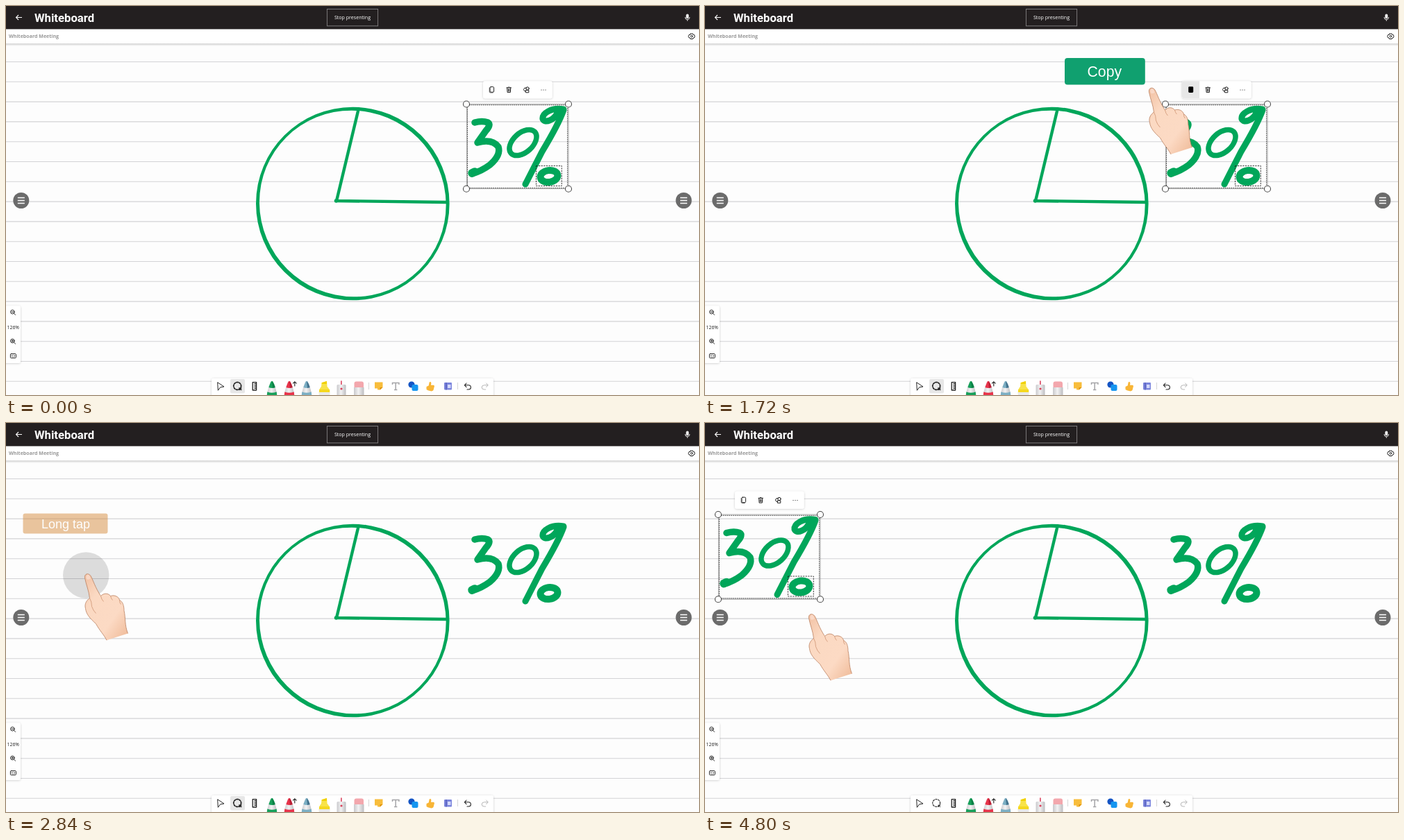
Write an HTML page that moves like this. It is 998 by 561 pixels and loops after 5 s.

```html
<!DOCTYPE html>
<html lang="en">
<head>
<meta charset="utf-8">
<title>Whiteboard</title>
<style>
html, body { margin: 0; width: 100%; height: 100%; overflow: hidden; background: #fdfdfd; }
svg { display: block; width: 100vw; height: 100vh; }
text { font-family: "Open Sans", "Noto Sans", sans-serif; }
.label text { font-family: "Liberation Sans", Arial, sans-serif; fill: #fff; text-anchor: middle; }
.icon { fill: none; stroke: #222; stroke-width: 1; stroke-linecap: round; stroke-linejoin: round; }
.panel { fill: #fff; filter: url(#shadow); }
.ink { fill: none; stroke: #00a65a; stroke-linecap: round; stroke-linejoin: round; }
</style>
</head>
<body>
<svg viewBox="0 0 998 561" xmlns="http://www.w3.org/2000/svg">
  <defs>
    <filter id="shadow" x="-20%" y="-30%" width="140%" height="160%">
      <feDropShadow dx="0" dy=".6" stdDeviation="1.6" flood-color="#000" flood-opacity=".2"/>
    </filter>
    <linearGradient id="fade" x2="0" y2="1">
      <stop stop-color="#000" stop-opacity=".17"/><stop offset="1" stop-color="#000" stop-opacity="0"/>
    </linearGradient>
    <linearGradient id="skin" x2=".9" y2="1">
      <stop stop-color="#f1c0a2"/><stop offset=".3" stop-color="#fbd9c2"/>
      <stop offset=".7" stop-color="#fcdac4"/><stop offset="1" stop-color="#f0bd9c"/>
    </linearGradient>
    <linearGradient id="metal">
      <stop stop-color="#c9c9cc"/><stop offset=".45" stop-color="#f2f2f3"/><stop offset="1" stop-color="#bdbdc0"/>
    </linearGradient>

    <g id="percent" class="ink">
      <path stroke-width="9.5" d="M675 168Q686 165 694 168Q699 171 691 180L679 197Q700 191 709 203Q713 215 697 229Q685 238 671 242"/>
      <path stroke-width="11.5" d="M671 241L675 239"/>
      <ellipse stroke-width="7.5" cx="744.5" cy="197" rx="23" ry="14" transform="rotate(-42 744.5 197)"/>
      <path stroke-width="9" d="M803 149C785 146 772 155 773 163C776 170 790 164 794 154M803 150Q796 170 772 210L748 257"/>
      <ellipse stroke-width="10" cx="782" cy="245.5" rx="12.5" ry="8.5" transform="rotate(-8 782 245.5)"/>
    </g>

    <g id="selection">
      <rect x="663.3" y="141.5" width="146.7" height="122.2" fill="none" stroke="#888" stroke-width=".7"/>
      <g fill="none" stroke="#222" stroke-width=".9" stroke-dasharray="1.6 1.2">
        <rect x="664.5" y="142.8" width="144.2" height="119.6"/>
        <rect x="763.5" y="230.5" width="36.8" height="29" stroke-dasharray="2.2 1.4"/>
      </g>
      <g fill="#fff" stroke="#4a4a4a" stroke-width="1.1">
        <circle cx="663" cy="141.5" r="4.5"/><circle cx="810" cy="141.5" r="4.5"/>
        <circle cx="663" cy="263.7" r="4.5"/><circle cx="810" cy="263.7" r="4.5"/>
      </g>
      <rect class="panel" x="687" y="108.3" width="99.7" height="25" rx="3"/>
      <g class="icon">
        <rect x="697" y="116.6" width="5.6" height="7.6" rx="1.2"/><path d="M696.2 118v5.6q0 1.4 1.4 1.4h3.6" stroke-width=".7"/>
        <path d="M721 117.8h6.4M723 117.5q1.2-1.8 2.4 0M721.6 118l.5 6.6h4.2l.5-6.6M723.4 119.6v3.4M725 119.6v3.4"/>
        <path d="M748 122.8h-1.2l-1.4-2.2 1.4-2.4h3"/><circle cx="751" cy="119" r="2.2"/><path d="M748.8 121.4h4v3.4h-4z"/>
      </g>
      <path d="M771 121h.1M774 121h.1M777 121h.1" stroke="#222" stroke-width="1.2" stroke-linecap="round"/>
    </g>
  </defs>

  <rect width="998" height="561" fill="#fdfdfd"/>
  <path id="rules" stroke="#d3d3d6" stroke-width="1.1"/>
  <rect y="33" width="998" height="21" fill="#fff"/>
  <rect y="54" width="998" height="4" fill="url(#fade)"/>
  <rect width="998" height="33.4" fill="#231f20"/>

  <path d="M23 16.5H14.5M18 13L14.5 16.5L18 20" fill="none" stroke="#fff" stroke-width="1.1"/>
  <text x="41" y="23" fill="#fff" font-size="16.7" font-weight="700" style="font-family:Roboto,sans-serif">Whiteboard</text>
  <rect x="462.4" y="4.4" width="73.2" height="24.4" fill="none" stroke="#858384" stroke-width=".9"/>
  <text x="499" y="19" fill="#fff" font-size="7.1" text-anchor="middle">Stop presenting</text>
  <rect x="979.4" y="11.5" width="3.8" height="6.6" rx="1.9" fill="#fff"/>
  <path d="M978 16q0 3.6 3.3 3.6t3.3-3.6M981.3 19.6v2" fill="none" stroke="#fff" stroke-width=".9"/>
  <text x="4" y="46.4" fill="#999" font-size="7.05" font-weight="700">Whiteboard Meeting</text>
  <g class="icon" stroke-width=".9"><path d="M985.6 40h3.6l.6 1.4 1.6.4.6 1.9-.6 1.9-1.6.4-.6 1.5h-3.6l-.6-1.5-1.6-.4-.6-1.9.6-1.9 1.6-.4z"/><circle cx="987.4" cy="43.7" r="1.4"/></g>

  <path fill="#00a65a" fill-rule="evenodd" d="M360 285a139.3 139.3 0 1 0 278.6 0a139.3 139.3 0 1 0-278.6 0zM405.1 379.4A133.3 135.3 -45 0 0 593.5 190.6A133.3 135.3 -45 0 0 405.1 379.4z"/>
  <path class="ink" stroke-width="4.4" d="M507 151.5L476 281L633.5 283"/>
  <circle cx="475.4" cy="281" r="2.7" fill="#00a65a"/>

  <use href="#percent"/>
  <g id="firstSelection">
    <use href="#selection"/>
    <g id="copyHover"><path d="M712 108.3h-22q-3 0-3 3v19q0 3 3 3h22z" fill="#e7e7e7"/><rect x="696.2" y="116.2" width="7" height="8.8" rx="1.4"/></g>
  </g>
  <g id="pasted" transform="translate(-644 -9.5)"><use href="#percent"/><use href="#selection"/></g>

  <g id="menus"></g>

  <g>
    <rect class="panel" x="-4" y="432.5" width="25" height="82.5" rx="3"/>
    <g class="icon"><circle cx="9.4" cy="441.2" r="2.8"/><path d="M11.6 443.4L13.6 445.4M8.2 441.2h2.4"/>
      <circle cx="9.4" cy="483" r="2.8"/><path d="M11.6 485.2L13.6 487.2M8.2 483h2.4M9.4 481.8v2.4"/>
      <rect x="6.4" y="501.6" width="8" height="6" rx="1"/><path d="M9.4 503.6L8 504.6L9.4 505.6M11.4 503.6L12.8 504.6L11.4 505.6" stroke-width=".8"/></g>
    <text x="10.3" y="465.7" font-size="6.9" text-anchor="middle" fill="#222">126%</text>
  </g>

  <rect class="panel" x="296" y="537" width="406" height="30" rx="3"/>
  <rect id="lassoOn" x="323" y="538" width="21" height="20.5" rx="2" fill="#e7e7e7"/>
  <g class="icon">
    <path d="M305 543L314 549L308.8 549.8L305.6 554z"/>
    <g id="lasso"><circle cx="333.2" cy="548" r="5.4" stroke-dasharray="2.3 1.6"/><path d="M336 551l2.6 2.4M338.6 551l-2.6 2.4"/></g>
    <path d="M355.2 542.6h5.4v11.4h-5.4zM358 545h2M358 548h2M358 551h2" stroke-width="1.3"/>
    <path d="M415.8 548v-6M413.4 544.2L415.8 541.8L418.2 544.2" stroke-width="1.1"/>
    <path d="M663 544L660.4 546.8L663 549.6M660.8 546.8H666Q669.4 547 669.4 550T666 553H664" stroke-width="1.1"/>
    <path d="M691.6 544L694.2 546.8L691.6 549.6M693.8 546.8H688.6Q685.2 547 685.2 550T688.6 553H690.6" stroke="#b5b5b5"/>
  </g>
  <g id="pens"></g>
  <path d="M451 561Q450 552 454 549L454.6 543L462 541L462.6 549Q467 552 466 561z" fill="#f8e34a"/>
  <path d="M454.8 543.6L461.8 541L462 545H454.8z" fill="#f0d000"/><path d="M450.8 556h15.6v5h-15.6z" fill="#e9e9ea"/><path d="M451 553h15.2v4h-15.2z" fill="#f5d820"/>
  <path d="M482.9 541v6" stroke="#d9425c" stroke-width="1.6" stroke-linecap="round"/>
  <rect x="476.5" y="546" width="13" height="18" rx="1.5" fill="url(#metal)"/><circle cx="483" cy="552" r="1.6" fill="#d9425c"/>
  <rect x="501.5" y="541.5" width="13.5" height="12" rx="3" fill="#f3a7ad"/><rect x="501" y="550" width="14.5" height="14" fill="url(#metal)"/>
  <path d="M522.5 543v10M650.5 543v10" stroke="#d6d6d6"/>
  <path d="M531 542.5h11.5v7.5L539 553.5h-4v-2h-4z" fill="#f8bd3c"/><path d="M538.5 553.5V550h4z" fill="#dd9110"/>
  <path d="M556.5 546v-2.4h9.4v2.4M561.2 543.6v10M559 553.6h4.4" fill="none" stroke="#a5a5a8" stroke-width="1.5"/>
  <circle cx="584" cy="546" r="4.6" fill="#1454c4"/><rect x="584.5" y="546" width="9" height="9" rx="2" fill="#1595f0"/>
  <path d="M605.5 549l3.2-1.4 1-5.2q2.6-1.2 2.7 1.6l-.4 2.8h4q1.7 1 .6 3l-1.1 4.2q-1 1.5-3 1.4l-5-1.2-2-1.2z" fill="#f8b536"/>
  <rect x="631" y="543" width="11" height="10.6" rx="1" fill="#7c86dd"/><path d="M634 543v10.6" stroke="#4850b0"/><path d="M636 546h4.5v5H636z" fill="#d4d9fa"/>

  <g id="sideButtons"></g>

  <circle id="press" cx="115.2" cy="219.5" r="33.2" fill="#000" fill-opacity=".13"/>
  <g id="copyLabel" class="label"><rect x="518" y="75" width="115.8" height="38.5" rx="4" fill="#10a06f"/><text x="575.3" y="101.7" font-size="21.2">Copy</text></g>
  <g id="tapLabel" class="label"><rect x="24.5" y="130.5" width="122" height="29" rx="3" fill="#d48938"/><text x="86" y="151.6" font-size="18">Long tap</text></g>

  <g id="hand">
    <path fill="url(#skin)" d="M1 6C0 0 6-2 9.500 3C13 9 16 20 24 32C29 27 35 28 38 32C44 30 50 33 51 38C56 40 57.500 47 57.500 53C60 64 58 73 63 86L32.500 95.800C28 87 23 83 17 72C8 64 3 58 2 50C0 43 4 38 8 35C7 25 3 16 1 6z"/>
    <path fill="none" stroke="#b67a58" stroke-width=".75" d="M63 86C58 73 60 64 57.500 53C57.500 47 56 40 51 38C50 33 44 30 38 32C35 28 29 27 24 32C16 20 13 9 9.500 3C6-2 0 0 1 6C3 16 7 25 8 35C4 38 0 43 2 50C3 58 8 64 17 72C23 83 28 87 32.500 95.800"/>
    <path fill="none" stroke="#c98c69" stroke-width=".7" d="M8 35Q11 40 11 47Q13 53 17 57M24 32Q25 37 28 40M38 32Q39 36 41 38M51 38Q51 42 53 44"/>
    <path d="M3 5Q3 1 6 1Q8 2 9 7Q6 9 4 8z" fill="#fbe0d3" opacity=".7"/>
  </g>
</svg>
<script>
const el = id => document.getElementById(id);
const clamp = v => Math.min(1, Math.max(0, v));
const ramp = (t, from, to) => clamp((t - from) / (to - from));
const show = (id, on) => el(id).setAttribute('display', on ? 'inline' : 'none');
const fade = (id, value) => el(id).setAttribute('opacity', value);

el('rules').setAttribute('d', Array.from({ length: 17 }, (_, i) => `M0 ${80.5 + 28.8 * i}H998`).join(''));

el('pens').innerHTML = [[383, '#17a05a', '#0b8146'], [408, '#e8334a', '#b81f35'], [433, '#7cafc4', '#44738e']]
  .map(([x, tip, dark]) => `<g transform="translate(${x} 541)">
    <path d="M-7.200 20Q-6.500 12-1.800 1Q0-1 1.800 1Q6.500 12 7.200 20z" fill="url(#metal)"/>
    <path d="M-4.700 9Q-3 4-1.500.800Q0-.800 1.500.800Q3 4 4.700 9Q0 11-4.700 9z" fill="${tip}"/>
    <path d="M0 0Q3 3 4.700 9L1 10z" fill="${dark}"/>
    <path d="M-7.200 20Q-7 17-6.600 15.500Q0 18 6.600 15.500Q7 17 7.200 20z" fill="${tip}"/></g>`).join('');

el('sideButtons').innerHTML = [21.8, 976].map(x => `<circle cx="${x}" cy="280.500" r="11.500" fill="#6b6b6b"/>
  <path d="M${x - 5} 276.500h10m-10 4h10m-10 4h10" stroke="#fff" stroke-width="1.400"/>`).join('');

const rowIcons = [
  '<path d="M120.5 223.5h6.500v4l-2.500 2.500h-4z"/>',
  '<path d="M120.500 249h6.500v6.500h-6.500zM122 251h3.500M123.700 251v3"/>',
  '<path d="M120.500 274h6v7h-6zM122 273.500h3M123 277h3.500"/>'
];
el('menus').innerHTML = `<rect class="panel" x="113" y="214.500" width="100.500" height="75.500" rx="3"/>
  <rect id="menuHover" x="113" width="100.500" height="25" rx="2" fill="#ededed"/>` +
  ['Note', 'Text', 'Paste'].map((name, i) =>
    `<g class="icon" id="row${i}">${rowIcons[i]}</g><text x="134" y="${229.5 + 25 * i}" font-size="7.200" fill="#111">${name}</text>`).join('');

// Hand positions: time, x, y
const path = [
  [200, 732, 152], [300, 732, 152], [700, 702, 115], [1560, 702, 115], [1720, 639, 118],
  [2040, 323, 176.5], [2120, 288.5, 184], [2480, 112.5, 217.5], [3360, 112.5, 217.5],
  [3440, 119, 228], [3800, 148.5, 275.5], [5000, 148.5, 275.5]
];
const slope = (i, axis) => i < 0 || i > path.length - 2 ? 0
  : (path[i + 1][axis] - path[i][axis]) / (path[i + 1][0] - path[i][0]);
function tangent(i, axis) {
  const a = slope(i - 1, axis), b = slope(i, axis);
  return a * b > 0 ? 2 * a * b / (a + b) : 0;
}
function handAt(t, axis) {
  if (t <= path[0][0]) return path[0][axis];
  const i = path.findIndex((p, k) => t < path[k + 1]?.[0]);
  const span = path[i + 1][0] - path[i][0], u = (t - path[i][0]) / span, v = 1 - u;
  return path[i][axis] * v * v * (1 + 2 * u) + path[i + 1][axis] * u * u * (3 - 2 * u)
    + span * u * v * (tangent(i, axis) * v - tangent(i + 1, axis) * u);
}

function draw(t) {
  const x = handAt(t, 1), y = handAt(t, 2);
  el('hand').setAttribute('transform', `translate(${x} ${y})`);
  fade('hand', ramp(t, 160, 440));

  show('firstSelection', t < 2560);
  show('copyHover', t >= 700);
  const grow = ramp(t, 1000, 1235);
  el('copyLabel').setAttribute('transform', `translate(572.4 94.2) scale(${grow}) translate(-572.4 -94.2)`);
  fade('copyLabel', Math.min(1, grow * 2) * (1 - ramp(t, 1955, 2190)));

  const lassoActive = t < 2920;
  show('lassoOn', lassoActive);
  el('lasso').setAttribute('stroke-width', lassoActive ? 1.7 : 1.1);
  show('press', t >= 2500 && t < 2960);
  fade('press', ramp(t, 2480, 2620));
  fade('tapLabel', ramp(t, 2720, 2970) * (1 - ramp(t, 3600, 3840)));

  show('menus', t >= 2960 && t < 3940);
  const row = t < 3400 ? -1 : Math.min(2, Math.max(0, Math.round((y - 227) / 25)));
  show('menuHover', row >= 0);
  el('menuHover').setAttribute('y', 214.5 + 25 * Math.max(0, row));
  el('row0').style.fill = row === 0 ? '#111' : 'none';
  show('pasted', t >= 3960);
}

function frame(now) {
  draw(now % 5000);
  requestAnimationFrame(frame);
}
draw(0);
requestAnimationFrame(frame);
</script>
</body>
</html>
```
